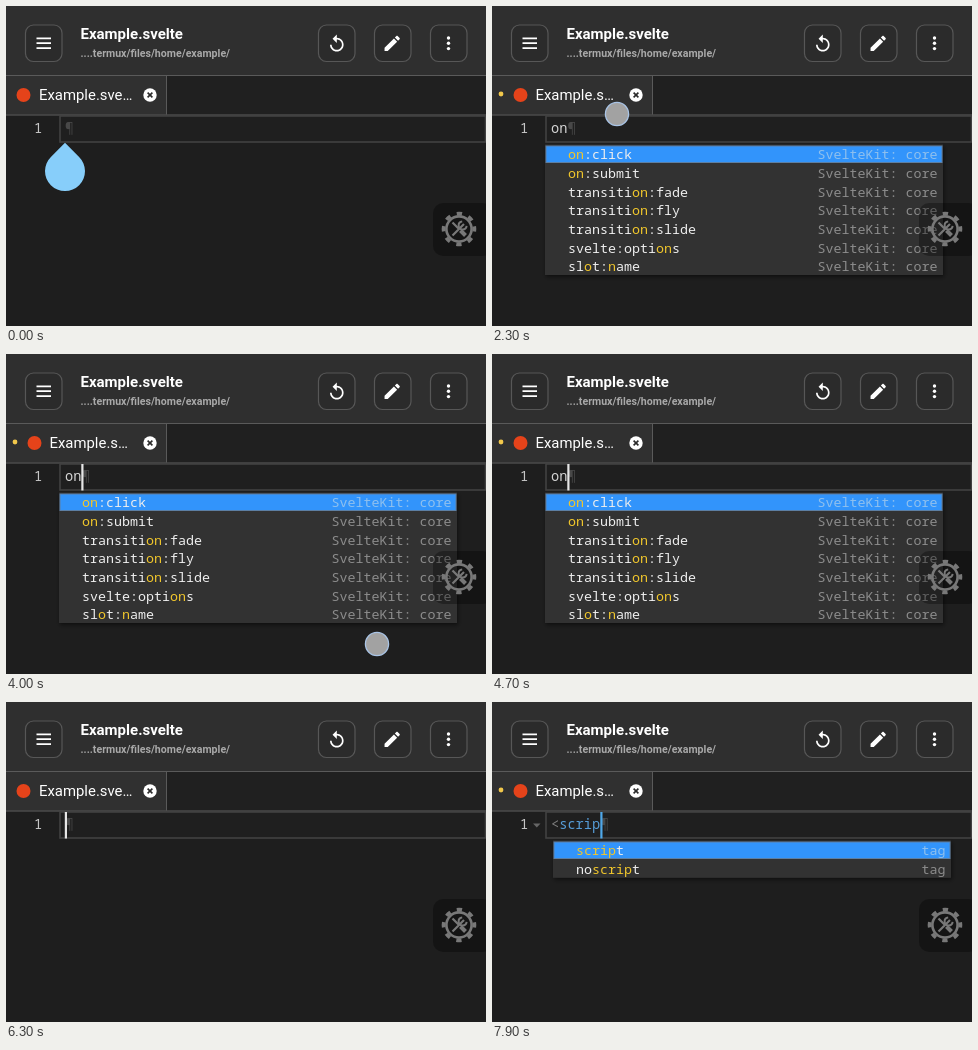
These frames come from a looping animation (480x320 px, 8 s). An HTML page:

```html
<!DOCTYPE html>
<html lang="en">
<head>
<meta charset="utf-8">
<title>Editor autocomplete</title>
<style>
  html, body { margin: 0; width: 480px; height: 320px; overflow: hidden; background: #1e1e1e; }
  svg { display: block; }
  text { white-space: pre; }
  .ui { font-family: Roboto, sans-serif; }
  .mono { font-family: "Noto Sans Mono", "DejaVu Sans Mono", monospace; }
  .code { font-size: 13.67px; }
  .list { font-size: 13.33px; fill: #eee; }
  .list .hit { fill: #f0c62c; }
  .list .meta { fill: #8c8c8c; }
  .list .on .meta { fill: #8fc0ee; }
</style>
</head>
<body>
<svg width="480" height="320" viewBox="0 0 480 320">
  <defs>
    <filter id="shade" x="-10%" y="-20%" width="120%" height="150%">
      <feDropShadow dx="1" dy="2" stdDeviation="2" flood-color="#000" flood-opacity=".5"/>
    </filter>
  </defs>

  <rect width="480" height="320" fill="#1e1e1e"/>
  <rect width="480" height="69" fill="#2f2f2f"/>

  <g fill="#2b2b2b" stroke="#575757" stroke-width="1.2">
    <rect x="19.5" y="19" width="36.5" height="36.5" rx="8"/>
    <rect x="312.5" y="19" width="36.5" height="36.5" rx="8"/>
    <rect x="368.5" y="19" width="36.5" height="36.5" rx="8"/>
    <rect x="424.5" y="19" width="36.5" height="36.5" rx="8"/>
  </g>
  <g fill="#fff">
    <path d="M30.5 32.3h14.5M30.5 37.2h14.5M30.5 42.1h14.5" stroke="#fff" stroke-width="1.8"/>
    <path transform="translate(320.6 27.6) scale(.85)" d="M12 5V1L7 6l5 5V7c3.31 0 6 2.69 6 6s-2.69 6-6 6-6-2.69-6-6H4c0 4.42 3.58 8 8 8s8-3.58 8-8-3.58-8-8-8z"/>
    <path transform="translate(376 27.2) scale(.85)" d="M3 17.25V21h3.75L17.81 9.94l-3.75-3.75L3 17.25zM20.71 7.04c.39-.39.39-1.02 0-1.41l-2.34-2.34c-.39-.39-1.02-.39-1.41 0l-1.83 1.83 3.75 3.75 1.83-1.83z"/>
    <circle cx="442.5" cy="32" r="1.7"/><circle cx="442.5" cy="37.3" r="1.7"/><circle cx="442.5" cy="42.6" r="1.7"/>
  </g>
  <text class="ui" x="74.5" y="33" font-size="15" font-weight="700" fill="#fff">Example.svelte</text>
  <text class="ui" x="74.5" y="51" font-size="10.6" font-weight="700" fill="#a9a9a9">....termux/files/home/example/</text>

  <rect y="69" width="480" height="41" fill="#202020"/>
  <rect y="70" width="160" height="39" fill="#303030"/>
  <path d="M0 69.5H480M160.5 70V109" stroke="#5a5a5a" fill="none"/>
  <path d="M0 109H480" stroke="#4a4a4a" stroke-width="1.5"/>
  <circle id="dot" cx="9" cy="88" r="2.4" fill="#f2c84b"/>
  <circle id="badge" cy="89" r="7" fill="#e5431a"/>
  <text id="tab" class="ui" y="94" font-size="14.9" fill="#fff"></text>
  <circle cx="144" cy="89" r="6.7" fill="#fff"/>
  <path d="M141.6 86.6l4.8 4.8m0-4.8l-4.8 4.8" stroke="#2a2a2a" stroke-width="1.6"/>

  <rect x="54" y="110" width="425.5" height="26" fill="#1f1f1f" stroke="#424242" stroke-width="1.6"/>
  <text class="mono code" x="28" y="127" fill="#c6c6c6">1</text>
  <path id="fold" d="M41 121.5h7.5l-3.75 4z" fill="#666"/>
  <text id="line" class="mono code" x="59" y="127"></text>
  <rect id="caret" y="110" width="2.2" height="26.5"/>
  <path id="drop" d="M59 136.7L73.1 150.9A20 20 0 1 1 44.9 150.9Z" fill="#87cefa"/>

  <g id="popup" class="mono list"></g>

  <g>
    <rect x="427" y="197" width="60" height="53" rx="10" fill="#000" fill-opacity=".32"/>
    <g transform="translate(453 223)" fill="none" stroke="#787878">
      <circle r="12.6" stroke-width="2.6"/>
      <circle r="15.4" stroke-width="3.8" stroke-dasharray="5.2 6.9" transform="rotate(-10)"/>
      <path d="M-6.5 -6.5L0 0M-6.5 6.5L5 -5" stroke-width="2.2"/>
      <path d="M1.5 1.5L6.5 6.5" stroke-width="4"/>
      <path d="M3.2 -7.6A4 4 0 1 0 7.6 -3.2" stroke-width="2"/>
    </g>
  </g>
  <circle id="touch" r="11.6" fill="#a2a2a2" stroke="#a9c4e6" stroke-width="1.3"/>
</svg>

<script>
const LOOP = 8000, CELL = 8.25, ROW = 18.65;
const $ = id => document.getElementById(id);

const typed = [
  [0, ''], [1300, 'o'], [1700, 'on'], [5300, 'o'], [5700, ''], [6400, '<'],
  [6900, '<s'], [7200, '<sc'], [7400, '<scr'], [7600, '<scri'], [7800, '<scrip']
];
const lists = {
  o: 'on:click on:submit out:fade slot slot:name let:props bind:group svelte:options',
  on: 'on:click on:submit transition:fade transition:fly transition:slide svelte:options slot:name',
  s: 's samp script section select small source span',
  sc: 'script noscript section source select'
};
const caretOff = [[0, 200], [700, 1000], [2300, 2800], [3300, 3800], [4300, 4700], [6000, 6300]];
const unsaved = [[2000, 6200], [6900, LOOP]];
// time, x, y of the finger sweeping round the list
const sweep = [
  [2100, 205, 103], [2300, 125, 108], [2500, 72, 145], [2800, 55, 245], [3100, 88, 281],
  [3500, 215, 306], [4000, 371, 290], [4250, 432, 225], [4450, 412, 142], [4700, 335, 128]
];

const within = (spans, t) => spans.some(([a, b]) => t >= a && t < b);
const show = (id, on) => $(id).setAttribute('visibility', on ? 'visible' : 'hidden');
const set = (id, attrs) => { for (const k in attrs) $(id).setAttribute(k, attrs[k]); };
const textAt = t => typed.filter(([at]) => at <= t).pop()[1];
const esc = s => s.replace('<', '&lt;');
const span = (cls, s) => `<tspan class="${cls}">${s}</tspan>`;

// Whole substring if there is one, otherwise letters in order.
function mark(word, query) {
  const at = word.indexOf(query);
  let n = 0;
  return [...word].map((c, i) => {
    const hit = at >= 0 ? i >= at && i < at + query.length : c === query[n];
    if (hit) n++;
    return hit ? span('hit', c) : c;
  }).join('');
}

function popupMarkup(text) {
  const tag = text[0] === '<', query = tag ? text.slice(1) : text;
  if (!query) return '';
  const words = (lists[query] || 'script noscript').split(' ');
  const x = tag ? 61 : 53, top = 138.5, meta = tag ? 'tag' : 'SvelteKit: core';
  const rows = words.map((w, i) => {
    const y = top + i * ROW + 14.8;
    return `<g class="${i ? '' : 'on'}"><text x="${x + 23}" y="${y}">${mark(w, query)}</text>` +
      `<text class="meta" x="${x + 392.4}" y="${y}" text-anchor="end">${meta}</text></g>`;
  }).join('');
  return `<rect x="${x}" y="${top}" width="398" height="${words.length * ROW}" fill="#303030" filter="url(#shade)"/>` +
    `<rect x="${x + 1}" y="${top + 1.5}" width="396" height="16.5" fill="#3294fb" stroke="#5d7fa3"/>` + rows;
}

function lineMarkup(text) {
  const code = text[0] === '<'
    ? `<tspan fill="#808080">&lt;</tspan><tspan fill="#569cd6">${text.slice(1)}</tspan>`
    : `<tspan fill="#d4d4d4">${esc(text)}</tspan>`;
  return code + '<tspan fill="#484848">¶</tspan>';
}

function spline(a, b, c, d, u) {
  return b + u * (c - a + u * (2 * a - 5 * b + 4 * c - d + u * (3 * (b - c) + d - a))) / 2;
}

function sweepAt(t) {
  const last = sweep.length - 1;
  if (t < sweep[0][0] || t >= sweep[last][0]) return null;
  const i = sweep.findIndex((p, k) => k < last && t < sweep[k + 1][0]);
  const p = k => sweep[Math.max(0, Math.min(last, k))];
  const u = (t - p(i)[0]) / (p(i + 1)[0] - p(i)[0]);
  return [1, 2].map(k => spline(p(i - 1)[k], p(i)[k], p(i + 1)[k], p(i + 2)[k], u));
}

const cache = {};
function fill(id, markup) {
  if (cache[id] !== markup) $(id).innerHTML = cache[id] = markup;
}

function draw(t) {
  const text = textAt(t), tag = text[0] === '<', dirty = within(unsaved, t);
  fill('line', lineMarkup(text));
  fill('popup', text ? popupMarkup(textAt(t - Math.min(t, 100))) : '');
  fill('tab', dirty ? 'Example.s…' : 'Example.sve…');
  set('tab', { x: dirty ? 43.5 : 33 });
  set('badge', { cx: dirty ? 28.5 : 17.5 });
  set('caret', { x: 58.8 + text.length * CELL, fill: tag ? '#4fa8ea' : '#e6e6e6' });
  show('dot', dirty);
  show('fold', tag);
  show('caret', !within(caretOff, t));
  show('drop', t < 1300);
  const at = sweepAt(t);
  show('touch', at);
  if (at) set('touch', { cx: at[0], cy: at[1] });
}

const start = performance.now();
function tick() {
  const t = (performance.now() - start) % LOOP;
  draw(Math.floor(t / 100) * 100);
  requestAnimationFrame(tick);
}
draw(0);
requestAnimationFrame(tick);
</script>
</body>
</html>
```
